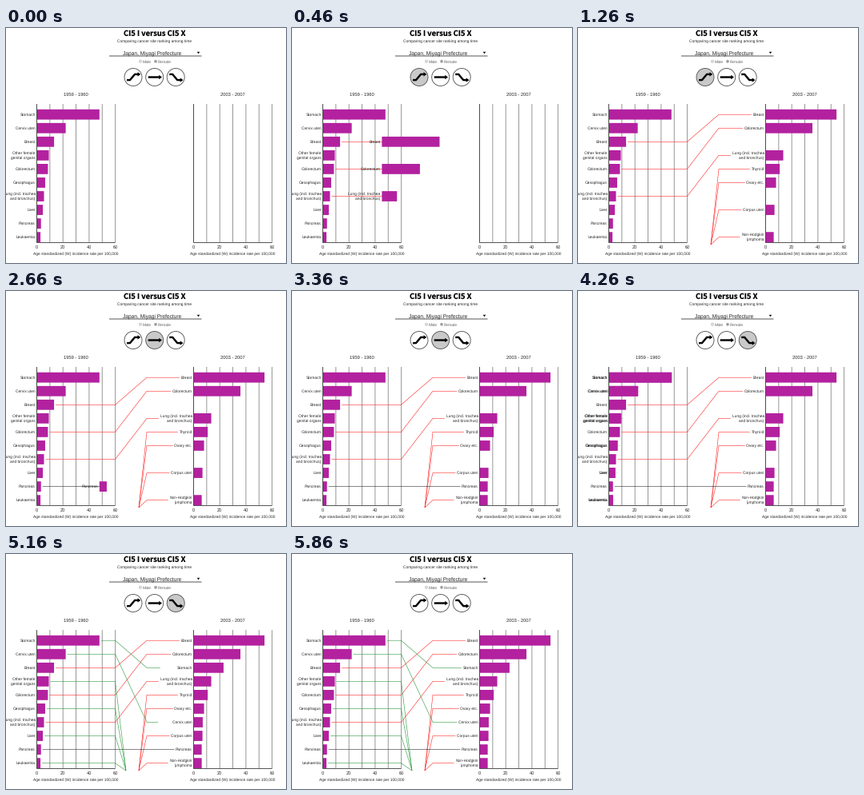
Write a matplotlib script that moves like this. It is 350 px wide and 294 px high and loops after 5.92 s.

```python
import matplotlib.pyplot as plt
from matplotlib.animation import FuncAnimation
from matplotlib.patches import Circle, Polygon, Rectangle

W, H, DPI = 350, 294, 100
LOOP, STEP = 5920, 20
PX = 72 / DPI  # points per pixel
BAR, RED, GREEN, INK = "#b3219f", "#ff2020", "#259535", "#262626"

LEFT_X, RIGHT_X, UNIT = 38.5, 234.5, 1.635
TOP, BASE, PITCH, BAR_H = 95, 268.5, 17.05, 12.8
MID_X, BEND_X = 136.5, 176
ENTRY, EXIT = (166, 271), (150, 271)

# name, left rank, left rate, right rank, right rate (None: outside that top ten)
RISING = [
    ("Breast", 3, 13.2, 1, 54.2),
    ("Colorectum", 5, 8.5, 2, 35.8),
    ("Lung (incl. trachea\nand bronchus)", 7, 5.5, 4, 13.5),
    ("Thyroid", 11, None, 5, 10.8),
    ("Ovary etc.", 12, None, 6, 8.0),
    ("Corpus uteri", 14, None, 8, 6.8),
    ("Non-Hodgkin\nlymphoma", 15, None, 10, 6.2),
]
STABLE = [("Pancreas", 9, 3.2, 9, 6.2)]
FALLING = [
    ("Stomach", 1, 47.9, 3, 22.9),
    ("Cervix uteri", 2, 22.1, 7, 7.0),
    ("Other female\ngenital organs", 4, 9.2, None, 1.2),
    ("Oesophagus", 6, 6.4, None, 2.4),
    ("Liver", 8, 4.6, None, 5.5),
    ("Leukaemia", 10, 2.8, None, 4.7),
]
# sites, line colour, motion start, highlight on, highlight off
GROUPS = [
    (RISING, RED, 178, 260, 1760),
    (STABLE, INK, 2366, 2260, 3860),
    (FALLING, GREEN, 4200, 4260, 5860),
]
PHASE, TAIL = 466, 60

plt.rcParams.update({"font.family": "Liberation Sans", "text.hinting": "none",
                     "path.snap": False, "toolbar": "None"})
fig = plt.figure(figsize=(W / DPI, H / DPI), dpi=DPI, facecolor="white")
ax = fig.add_axes([0, 0, 1, 1])
ax.set(xlim=(0, W), ylim=(H, 0))
ax.axis("off")


def write(x, y, text, size=4.87, ha="center", color=INK, **kw):
    """Text whose letters are centred on y."""
    return ax.text(x, y + 0.34 * size, text, fontsize=size * PX, ha=ha,
                   va="baseline", color=color, **kw)


def stroke(xs, ys, color=INK, width=0.9, z=1):
    return ax.plot(xs, ys, color=color, lw=width * PX, zorder=z,
                   solid_capstyle="butt")[0]


def row_y(rank):
    return 108.2 + (rank - 1) * PITCH


def lerp(a, b, p):
    return a + (b - a) * p


def clamp(p):
    return min(1.0, max(0.0, p))


def ease(p):
    p = clamp(p)
    return 4 * p ** 3 if p < 0.5 else 1 - 4 * (1 - p) ** 3


class Row:
    """A bar with its right-aligned label of one or two lines."""

    def __init__(self, name):
        self.bar = ax.add_patch(Rectangle((0, 0), 0, BAR_H, fc=BAR, lw=0, zorder=4))
        self.texts = [write(0, 0, s, ha="right", zorder=5) for s in name.split("\n")]

    def label_width(self):
        return max(t.get_window_extent().width for t in self.texts)

    def place(self, x, y, width, alpha=1.0):
        self.bar.set_bounds(x, y - BAR_H / 2, width, BAR_H)
        self.bar.set_alpha(alpha)
        for i, t in enumerate(self.texts):
            offset = (i - (len(self.texts) - 1) / 2) * 5.5
            t.set_position((x - 1.8, y + offset + 1.5))
            t.set_alpha(alpha)

    def show(self, on):
        for part in (self.bar, *self.texts):
            part.set_visible(on)


class Mover:
    """Carries a site from the left chart to the right one, drawing its line."""

    def __init__(self, site, color):
        name, rank0, rate0, rank1, rate1 = site
        self.row = Row(name)
        self.enters, self.leaves = rate0 is None, rank1 is None
        self.y0, self.y1 = row_y(rank0), row_y(rank1 or 11)
        self.w0, self.w1 = UNIT * (rate0 or 0), UNIT * rate1
        self.line = stroke([], [], color, 0.55, z=3)
        if self.enters:
            self.path = [ENTRY, ENTRY]
        else:
            self.path = [(LEFT_X + self.w0 + 2, self.y0), (MID_X, self.y0)]
        if self.leaves:
            self.path += [EXIT, EXIT]
        else:
            end = RIGHT_X - 3.5 - self.row.label_width()
            self.path += [(BEND_X, self.y1), (end, self.y1)]

    def update(self, phases):
        p1, p2, _ = phases
        alpha = p2 if self.enters else 1 - p2 if self.leaves else 1.0
        on = p1 > 0
        self.row.show(on and alpha > 0)
        self.line.set_visible(on)
        x = lerp(lerp(LEFT_X, MID_X, p1), RIGHT_X, p2)
        self.row.place(x, lerp(self.y0, self.y1, p2), lerp(self.w0, self.w1, p1), alpha)
        points = [self.path[0]]
        for a, b, p in zip(self.path, self.path[1:], phases):
            if p > 0:
                points.append((lerp(a[0], b[0], p), lerp(a[1], b[1], p)))
        self.line.set_data(*zip(*points))


def draw_chart(x0, title):
    write(x0 + 49, 83, title, 5.8)
    for k in range(7):
        x = x0 + k * 10 * UNIT
        stroke([x, x], [TOP, BASE], "#8c8c8c")
        if k % 2 == 0:
            write(x, 274.4, str(10 * k), 5.7)
    stroke([x0, x0], [TOP, BASE], "#444444", z=4.5)
    stroke([x0, x0 + 98], [BASE, BASE], "#444444")
    write(x0 + 49, 282, "Age standardized (W) incidence rate per 100,000")


def draw_button(cx, rise):
    """Round button with an arrow stepping up, straight or down."""
    cy = 61.5
    disc = ax.add_patch(Circle((cx, cy), 11, fc="white", ec="#555555", lw=0.9 * PX))
    start, end = cy + rise, cy - rise
    stroke([cx - 8, cx - 4, cx + 2, cx + 6], [start, start, end, end], "black", 2.4, z=2)
    ax.add_patch(Polygon([(cx + 5.5, end - 2.7), (cx + 9.3, end), (cx + 5.5, end + 2.7)],
                         fc="black", lw=0, zorder=2))
    return disc


write(185.5, 6.3, "CI5 I versus CI5 X", 9.4, weight="bold", color="black",
      family="Noto Sans CJK JP")
write(185.5, 16, "Comparing cancer site ranking among time")
write(182.5, 31, "Japan, Miyagi Prefecture", 6.6)
stroke([129, 244.5], [35, 35], "#444444")
ax.add_patch(Polygon([(238.7, 29.8), (242.3, 29.8), (240.5, 32.2)], fc="black", lw=0))
for x, word, dot in [(168, "Male", "#dddddd"), (187, "Female", "#999999")]:
    ax.add_patch(Circle((x, 41.7), 1.7, fc=dot, ec="#bbbbbb", lw=0.5 * PX))
    write(x + 3, 42, word, 5.1, ha="left", color="#666666")

discs = [draw_button(cx, rise) for cx, rise in [(159, 3.6), (185.7, 0), (212.2, -3.6)]]
draw_chart(LEFT_X, "1959 - 1960")
draw_chart(RIGHT_X, "2003 - 2007")

for sites, *_ in GROUPS:
    for name, rank, rate, *_ in sites:
        if rate is not None:
            Row(name).place(LEFT_X, row_y(rank), UNIT * rate)

movers = [[Mover(site, color) for site in sites] for sites, color, *_ in GROUPS]

# Unsnapped edges keep the slow motion smooth.
for artist in (*ax.patches, *ax.lines):
    artist.set_snap(False)


def update(i):
    now = (i * STEP - 60) // 100 * 100 + 60  # the picture refreshes every 100 ms
    for (_, _, start, on, off), disc, group in zip(GROUPS, discs, movers):
        disc.set_facecolor("#c9c9c9" if on <= now < off else "white")
        t = now - start
        phases = (ease(t / PHASE), ease(t / PHASE - 1), clamp((t - 2 * PHASE) / TAIL))
        for mover in group:
            mover.update(phases)
    return []


anim = FuncAnimation(fig, update, frames=LOOP // STEP, interval=STEP,
                     init_func=lambda: update(0), repeat=True, repeat_delay=0)
plt.show()
```
